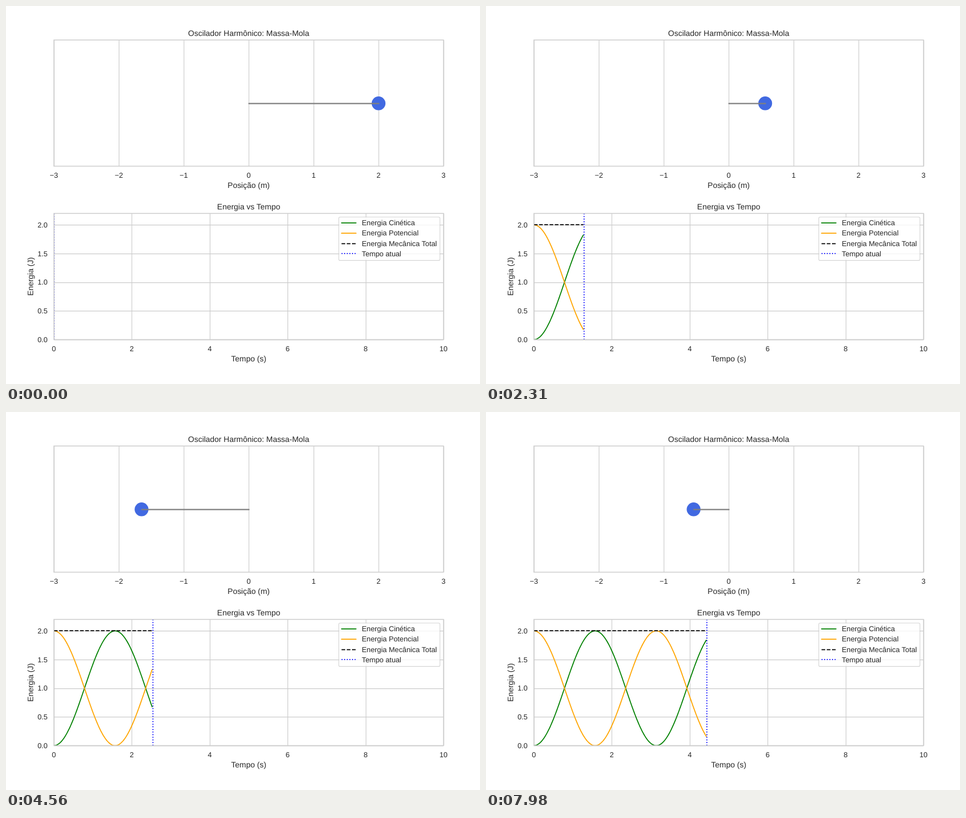
An HTML page for the animation above (8000 ms loop, 837x669 px).

```html
<!DOCTYPE html>
<html lang="pt">
<head>
<meta charset="utf-8">
<title>Oscilador Harmônico</title>
<style>
  html, body { margin: 0; width: 100%; height: 100%; overflow: hidden; background: #fff; }
  svg { display: block; width: 100vw; height: 100vh; }
  text { font: 15.28px "Liberation Sans", Arial, sans-serif; fill: #262626; text-rendering: geometricPrecision; }
  .big { font-size: 16.67px; }
  .mid { text-anchor: middle; }
  .end { text-anchor: end; }
  path, rect { fill: none; }
  .grid { stroke: #ccc; stroke-width: 1.39; }
  .spine { stroke: #ccc; stroke-width: 1.74; }
  .box { fill: #fff; stroke: #ccc; stroke-width: 1.39; opacity: .8; }
  .line { stroke-width: 2.083; stroke-linejoin: round; }
  .kinetic { stroke: green; stroke-linecap: round; }
  .potential { stroke: orange; stroke-linecap: round; }
  .total { stroke: #000; stroke-dasharray: 7.708 3.333; }
  .now { stroke: blue; stroke-dasharray: 2.083 3.4375; }
  .spring { stroke: gray; stroke-width: 2.78; stroke-linecap: round; }
  .mass { fill: #4169e1; }
</style>
</head>
<body>
<svg viewBox="0 0 1000 800" preserveAspectRatio="none"></svg>
<script>
const LOOP = 8000, STEP = 30, SAMPLES = 600, DURATION = 10, AMPLITUDE = 2;
const LEFT = 101, WIDTH = 822, HEIGHT = 267, TOP_A = 72, TOP_B = 439;
const BOTTOM_B = TOP_B + HEIGHT, MIDDLE = LEFT + WIDTH / 2;

const svg = document.querySelector('svg');

function add(tag, attrs, parent = svg) {
  const node = document.createElementNS('http://www.w3.org/2000/svg', tag);
  for (const key in attrs) node.setAttribute(key, attrs[key]);
  return parent.appendChild(node);
}
const path = (cls, d = '', parent = svg) => add('path', { class: cls, d }, parent);
const label = (cls, x, y, text, attrs = {}) =>
  add('text', { class: cls, x, y, ...attrs }).textContent = text;

const posX = x => LEFT + (x + 3) / 6 * WIDTH;
const timeX = t => LEFT + t / DURATION * WIDTH;
const energyY = e => BOTTOM_B - e / 2.2 * HEIGHT;
const timeAt = i => i * DURATION / (SAMPLES - 1);
const positionAt = t => AMPLITUDE * Math.cos(t);
const potentialAt = t => positionAt(t) ** 2 / 2;
const kineticAt = t => AMPLITUDE ** 2 / 2 - potentialAt(t);

function panel(top, title, xLabel, ticks, toX) {
  const bottom = top + HEIGHT;
  for (const tick of ticks) {
    path('grid', `M${Math.round(toX(tick)) + .5} ${bottom}V${top}`);
    label('mid', toX(tick), bottom + 25, String(tick).replace('-', '\u2212'));
  }
  label('big mid', MIDDLE, top - 8.3, title);
  label('big mid', MIDDLE, bottom + 46, xLabel);
}
const spines = top => add('rect', { class: 'spine', x: LEFT, y: top, width: WIDTH, height: HEIGHT });

// Upper panel
panel(TOP_A, 'Oscilador Harmônico: Massa-Mola', 'Posição (m)', [-3, -2, -1, 0, 1, 2, 3], posX);
const mass = add('circle', { class: 'mass', cy: 206, r: 14.58 });
const spring = path('spring');
spines(TOP_A);

// Lower panel
panel(TOP_B, 'Energia vs Tempo', 'Tempo (s)', [0, 2, 4, 6, 8, 10], timeX);
for (const e of [0, .5, 1, 1.5, 2]) {
  path('grid', `M${LEFT} ${Math.round(energyY(e)) + .5}h${WIDTH}`);
  label('end', LEFT - 13.2, energyY(e) + 5.5, e.toFixed(1));
}
label('big mid', 0, 0, 'Energia (J)', { transform: `translate(57.5 ${TOP_B + HEIGHT / 2}) rotate(-90)` });

const clip = add('clipPath', { id: 'plot' });
add('rect', { x: LEFT, y: TOP_B, width: WIDTH, height: HEIGHT }, clip);
const plot = add('g', { 'clip-path': 'url(#plot)' });
const [kinetic, potential, total, now] =
  ['kinetic', 'potential', 'total', 'now'].map(name => path('line ' + name, '', plot));
spines(TOP_B);

// Legend
add('rect', { class: 'box', x: 702, y: 446.6, width: 213.5, height: 92, rx: 3 });
[
  ['kinetic', 'Energia Cinética'],
  ['potential', 'Energia Potencial'],
  ['total', 'Energia Mecânica Total'],
  ['now', 'Tempo atual']
].forEach(([name, text], i) => {
  path('line ' + name, `M707.9 ${Math.round(459 + 21.8 * i)}h30.56`);
  label('', 750.7, 464.3 + 21.8 * i, text);
});

function curve(count, energy) {
  const points = Array.from({ length: count }, (_, i) => {
    const t = timeAt(i);
    return `${timeX(t).toFixed(2)} ${energyY(energy(t)).toFixed(2)}`;
  });
  return count ? 'M' + points.join('L') : '';
}

let shown = -1;
function draw() {
  const step = Math.floor(performance.now() % LOOP / STEP);
  if (step !== shown) {
    shown = step;
    const t = timeAt(step);
    const x = Math.round(posX(positionAt(t)));
    mass.setAttribute('cx', x);
    spring.setAttribute('d', `M${MIDDLE + .5} 206.5H${x + .5}`);
    kinetic.setAttribute('d', curve(step, kineticAt));
    potential.setAttribute('d', curve(step, potentialAt));
    total.setAttribute('d', step ? `M${LEFT} ${Math.round(energyY(2))}H${timeX(timeAt(step - 1))}` : '');
    now.setAttribute('d', `M${Math.round(timeX(t))} ${BOTTOM_B}V${TOP_B}`);
  }
  requestAnimationFrame(draw);
}
draw();
</script>
</body>
</html>
```
